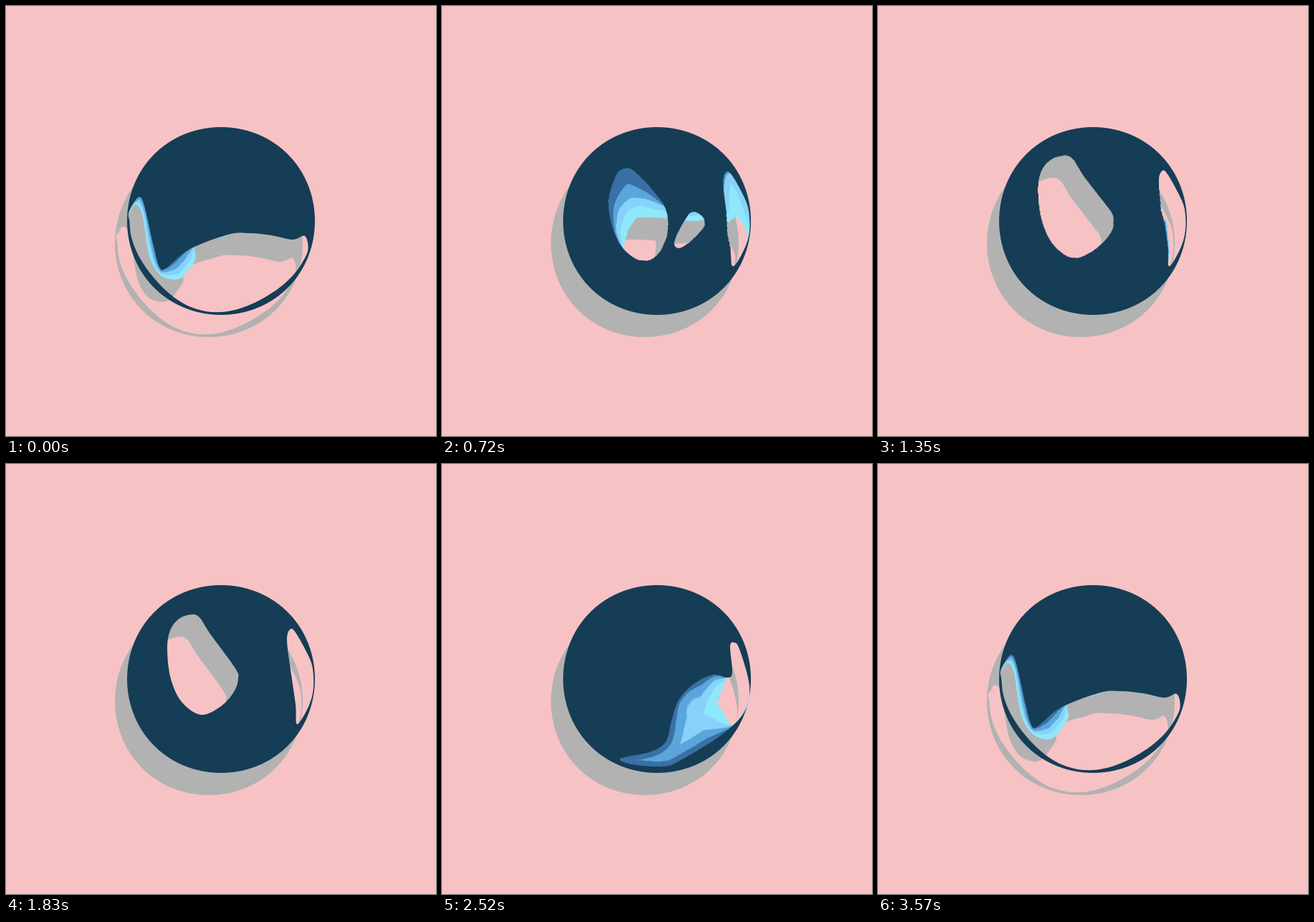
These frames come from a looping animation (600 px wide and 600 px high, 3600 ms). An HTML page with a canvas:

```html
<!DOCTYPE html>
<html lang="en">
<head>
<meta charset="utf-8">
<title>Liquid sphere</title>
<style>
  html, body { margin: 0; width: 100%; height: 100%; overflow: hidden; background: #f7c2c4; }
  canvas { display: block; }
</style>
</head>
<body>
<canvas id="stage" width="600" height="600"></canvas>
<script>
const LOOP = 3600, LAG = 115, REACH = 40;
const CENTER = 300, RADIUS = 131, ORIGIN = 168, SIZE = 264, CELLS = SIZE * SIZE;
const COLORS = [[21, 61, 85], [57, 112, 166], [90, 166, 220], [135, 210, 248], [143, 232, 250]];

const clamp = (v, lo = 0, hi = 1) => v < lo ? lo : v > hi ? hi : v;

// Wavy inner edge of the thin ring left at the bottom, between two angles in degrees.
function bowl(from, to) {
  let points = '';
  for (let deg = from; deg <= to; deg += 9) {
    const angle = deg * Math.PI / 180;
    const r = 125.3 + 2.5 * Math.cos(4.5 * (angle - Math.PI / 9));
    points += ` ${CENTER + r * Math.cos(angle)},${CENTER + r * Math.sin(angle)}`;
  }
  return points;
}

// Key points of the opening as it flows over the sphere.
const slit = '392,245 396,231 404,235 424,272 429,295 428,320 420,343 406,363 404,335 396,280';
const wide = '171,289 178,275 186,266 193,278 206,335 214,364 223,366 255,340 310,319 340,317 370,320 400,326 417,321'
  + bowl(18, 180);
const wave = '246,320 246,300 253,282 275,272 310,280 345,289 370,282 392,287 394,255 400,235 412,246 425,275 432,315'
  + bowl(18, 99) + ' 240,414 198,368 225,391 253,401 285,381 262,358 | 171,286 174,294 180,293 186,325 198,367 176,328';
const split = '230,270 240,232 257,222 272,228 295,255 312,284 311,315 295,348 274,353 250,335 236,305'
  + ' | 343,293 355,288 365,300 357,314 329,333 | ' + slit;
const mask = '211,262 213,238 225,214 245,203 270,200 284,209 300,237 330,262 365,278 385,274 390,238 396,225 404,230 '
  + '425,270 431,290 426,325 410,361 405,362 407,340 402,297 391,314 382,334 340,350 285,366 262,360 240,340 222,305';
const eye = '225,262 228,235 240,217 258,210 270,214 285,237 320,285 324,300 318,318 300,338 272,350 245,332 230,300 | ' + slit;
const fin = '249,411 290,402 312,388 320,360 330,330 350,308 378,294 399,298 405,290 402,255 407,249 415,258 429,310 '
  + '422,346 390,378 335,412 310,422 265,419';
const swell = '170,290 175,287 180,279 188,295 195,345 205,368 220,384 240,390 255,383 271,354 261,330 268,314 285,315 '
  + '299,324 345,308 370,309 402,320 417,297 430,316' + bowl(18, 180);

// Closed smooth curves through the points of each part.
function traceOutline(ctx, outline) {
  ctx.beginPath();
  for (const part of outline.split('|')) {
    const pts = part.trim().split(/\s+/).map(p => p.split(',').map(v => v - ORIGIN));
    const at = i => pts[(i + pts.length) % pts.length];
    const handle = (i, dir) => [0, 1].map(axis => at(i)[axis] + dir * (at(i + 1)[axis] - at(i - 1)[axis]) / 6);
    ctx.moveTo(...pts[0]);
    pts.forEach((_, i) => ctx.bezierCurveTo(...handle(i, 1), ...handle(i + 1, -1), ...at(i + 1)));
    ctx.closePath();
  }
}

const hull = new Uint16Array(SIZE), bounds = new Float64Array(SIZE + 1), line = new Float64Array(SIZE);

// Squared distance transform along one row or column.
function transformLine(grid, offset, stride) {
  let k = 0, s;
  hull[0] = 0;
  bounds[0] = -1e20;
  bounds[1] = 1e20;
  for (let q = 0; q < SIZE; q++) line[q] = grid[offset + q * stride];
  for (let q = 1; q < SIZE; q++) {
    do {
      const r = hull[k];
      s = (line[q] - line[r] + q * q - r * r) / (q - r) / 2;
    } while (s <= bounds[k] && --k > -1);
    hull[++k] = q;
    bounds[k] = s;
    bounds[k + 1] = 1e20;
  }
  k = 0;
  for (let q = 0; q < SIZE; q++) {
    while (bounds[k + 1] < q) k++;
    grid[offset + q * stride] = line[hull[k]] + (q - hull[k]) ** 2;
  }
}

function transform(grid) {
  for (let i = 0; i < SIZE; i++) transformLine(grid, i, SIZE);
  for (let i = 0; i < SIZE; i++) transformLine(grid, i * SIZE, 1);
}

function makeContext() {
  const canvas = document.createElement('canvas');
  canvas.width = canvas.height = SIZE;
  return canvas.getContext('2d', { willReadFrequently: true });
}

// Signed distance to the edge of the opening, positive inside it.
function distanceField(outline) {
  const ctx = makeContext();
  traceOutline(ctx, outline);
  ctx.fill();
  const pixels = ctx.getImageData(0, 0, SIZE, SIZE).data;
  const toHole = new Float64Array(CELLS), toSolid = new Float64Array(CELLS);
  for (let i = 0; i < CELLS; i++) {
    const a = pixels[i * 4 + 3] / 255;
    toHole[i] = a === 0 ? 1e10 : Math.max(0, 0.5 - a) ** 2;
    toSolid[i] = a === 1 ? 1e10 : Math.max(0, a - 0.5) ** 2;
  }
  transform(toHole);
  transform(toSolid);
  return Float32Array.from(toHole, (d, i) => clamp(Math.sqrt(toSolid[i]) - Math.sqrt(d), -REACH, REACH));
}

const [wideField, eyeField] = [wide, eye].map(distanceField);
const KEYS = [
  { time: 0, field: wideField },
  { time: 450, field: distanceField(wave) },
  { time: 750, field: distanceField(split) },
  { time: 990, field: distanceField(mask) },
  { time: 1400, field: eyeField },
  { time: 1830, field: eyeField },
  { time: 2520, field: distanceField(fin) },
  { time: 3000, field: distanceField(swell) },
  { time: 3540, field: wideField },
  { time: LOOP, field: wideField }
];

// The two neighbouring fields at a time, and how far it is between them.
function openingAt(t) {
  t = (t + LOOP) % LOOP;
  const next = KEYS.findIndex(key => key.time > t);
  const a = KEYS[next - 1], b = KEYS[next];
  return { from: a.field, to: b.field, mix: (t - a.time) / (b.time - a.time) };
}

// Coverage of the disc, very slightly fuller on the diagonals.
const disc = Float32Array.from({ length: CELLS }, (_, i) => {
  const x = i % SIZE + ORIGIN + 0.5 - CENTER, y = Math.floor(i / SIZE) + ORIGIN + 0.5 - CENTER;
  const bulge = 0.8 * Math.sin(2 * Math.atan2(y, x)) ** 2;
  return clamp(RADIUS + bulge + 0.5 - Math.hypot(x, y));
});

const body = makeContext();
const image = body.createImageData(SIZE, SIZE);
const stage = document.getElementById('stage').getContext('2d');

// Every layer repeats the motion of the one in front of it, a little later.
function paintBody(t) {
  const layers = COLORS.map((color, k) => ({ color, edge: k ? -0.1 : 0.5, ...openingAt(t - LAG * k) })).reverse();
  const data = image.data;
  for (let i = 0; i < CELLS; i++) {
    let r = 0, g = 0, b = 0, alpha = 0;
    if (disc[i] > 0) {
      for (const { color, edge, from, to, mix } of layers) {
        const cover = clamp(edge - from[i] - (to[i] - from[i]) * mix);
        r += (color[0] - r) * cover;
        g += (color[1] - g) * cover;
        b += (color[2] - b) * cover;
        alpha += (1 - alpha) * cover;
      }
    }
    const p = i * 4, scale = alpha ? 1 / alpha : 0;
    data[p] = r * scale;
    data[p + 1] = g * scale;
    data[p + 2] = b * scale;
    data[p + 3] = alpha * disc[i] * 255;
  }
  body.putImageData(image, 0, 0);
}

function draw() {
  paintBody(performance.now() % LOOP);
  stage.shadowColor = 'transparent';
  stage.fillStyle = '#f7c2c4';
  stage.fillRect(0, 0, 600, 600);
  stage.shadowColor = '#b2b2b2';
  stage.shadowOffsetX = -17;
  stage.shadowOffsetY = 31;
  stage.drawImage(body.canvas, ORIGIN, ORIGIN);
  requestAnimationFrame(draw);
}
draw();
</script>
</body>
</html>
```
